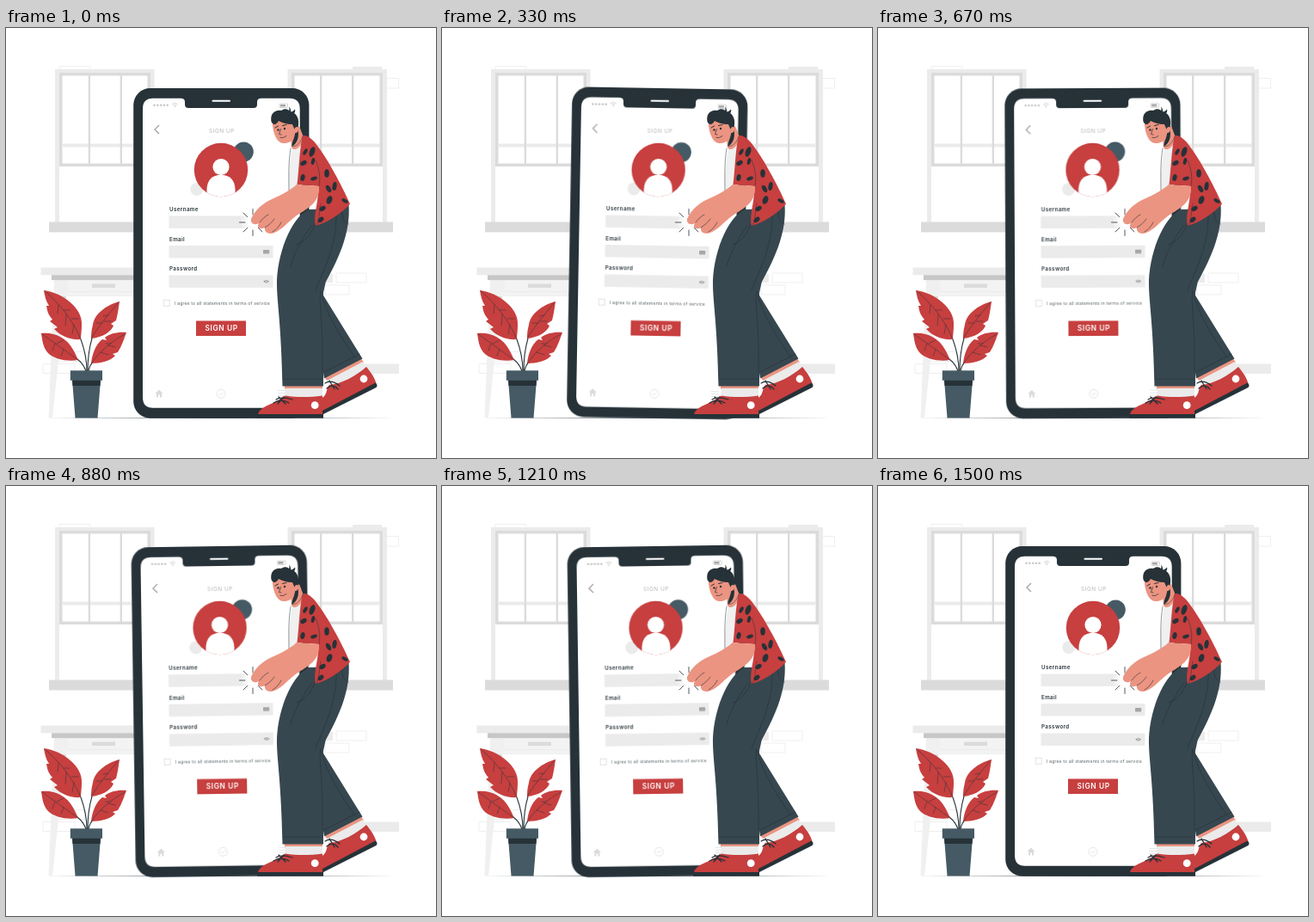
Animation, 500 px wide and 500 px high, one loop 1540 ms. Source, as an HTML page:

```html
<!DOCTYPE html>
<html lang="en">
<head>
<meta charset="utf-8">
<title>Sign up</title>
<style>
  html, body { margin: 0; width: 100%; height: 100%; overflow: hidden; background: #fff; }
  svg { display: block; width: 100%; height: 100%; }
  #phone { transform-origin: 250px 262px; }
  text { font-family: Inter, Lato, sans-serif; }
  .label { font-weight: 600; font-size: 6.2px; letter-spacing: .4px; fill: #263238; }
  .red { fill: #c73f3f; }
  .dark { fill: #263238; }
  .slate { fill: #455a64; }
  .skin { fill: #eb9481; }
  .pants { fill: #37474f; }
  .pale { fill: #ebebeb; }
  .grey { fill: #dbdbdb; }
  .ink { fill: none; stroke: #263238; stroke-linecap: round; stroke-linejoin: round; }
  .thin { fill: none; stroke: #ebebeb; }
</style>
</head>
<body>
<svg viewBox="0 0 500 500" stroke-width=".8">
  <defs>
    <clipPath id="face"><circle cx="250" cy="165" r="31.200"/></clipPath>
    <radialGradient id="glow">
      <stop offset=".35" stop-color="#fff"/>
      <stop offset="1" stop-color="#fff" stop-opacity="0"/>
    </radialGradient>
    <g id="window">
      <path class="pale" fill-rule="evenodd" d="M57 48H172.500V226H57ZM62 53V226H167.500V53Z"/>
      <path class="grey" fill-rule="evenodd" d="M62 52H168V161H62ZM65.500 55.500V157.500H164.500V55.500Z"/>
      <path class="pale" d="M65.500 134.500H164.500V138.500H65.500Z"/>
      <path class="grey" d="M95.700 55H98V158H95.700ZM132.700 55H135V158H132.700Z"/>
      <rect class="grey" x="50" y="225.500" width="118" height="12"/>
    </g>
  </defs>

  <g id="room">
    <path class="thin" d="M62 48V44.500H98V48M442 58.500H456.500V70H442M43 390.500H80V401.500H43ZM60 376.500H92V387.500H60ZM384 285H419V296H384ZM371 299H399V310H371Z"/>
    <rect class="pale" x="403" y="45" width="34" height="4"/>
    <use href="#window"/>
    <use href="#window" transform="matrix(-1 0 0 1 500 0)"/>
    <path fill="#f0f0f0" d="M56 293H71L54 453H49.500Z"/>
    <rect fill="#f3f3f3" x="70" y="293" width="90" height="18"/>
    <path class="thin" d="M72 293V306.500H150M70 293V311.500H150"/>
    <rect class="grey" x="100" y="297.500" width="27" height="4.500"/>
    <rect class="pale" x="40.500" y="278.500" width="115" height="8.800"/>
    <rect fill="#c7c7c7" x="53" y="287.300" width="100" height="5.800"/>
    <path class="grey" d="M64 312H70L69.500 317H63.500Z"/>
    <rect class="pale" x="368" y="286" width="12" height="10"/>
    <rect class="pale" x="396" y="390.500" width="61" height="11.500"/>
    <path class="dark" d="M44 453.600L250 453.200L453 453.600L250 454Z"/>
  </g>

  <g id="phone">
    <rect class="dark" x="148.200" y="70.100" width="204.200" height="383.600" rx="19.500"/>
    <path fill="#fff" d="M171 81.800H203Q208 81.800 208 86V89Q208 93 212 93H288Q292 93 292 89V86Q292 81.800 297 81.800H329.500Q341.700 81.800 341.700 94V429.500Q341.700 441.800 329.500 441.800H171Q159 441.800 159 429.500V94Q159 81.800 171 81.800Z"/>
    <path stroke="#fff" stroke-width="2" stroke-linecap="round" d="M240.500 84.700H260"/>
    <g id="status" fill="#c7c7c7"></g>
    <path fill="none" stroke="#c7c7c7" d="M193 88.700Q196.300 85.900 199.600 88.700M194.500 90.200Q196.300 88.700 198.100 90.200"/>
    <circle cx="196.300" cy="91.500" r=".7" fill="#c7c7c7"/>
    <rect x="318" y="88" width="9.500" height="4.500" rx="1" fill="none" stroke="#c7c7c7"/>
    <rect x="319" y="89" width="6" height="2.500" fill="#a6a6a6"/>
    <path fill="none" stroke="#a6a6a6" stroke-width="1.400" d="M178 113L173 118L178 123"/>
    <text x="251" y="122.300" text-anchor="middle" font-size="6.500" letter-spacing=".5" fill="#b8b8b8">SIGN UP</text>

    <circle class="slate" cx="276.300" cy="144" r="11.500"/>
    <circle class="pale" cx="221.800" cy="187.500" r="7.500"/>
    <circle class="red" cx="250" cy="165" r="31.200"/>
    <g fill="#fff" clip-path="url(#face)">
      <circle cx="250" cy="161.500" r="9.600"/>
      <path d="M233.500 198V188C233.500 177 240 170.700 250 170.700S266.500 177 266.500 188V198Z"/>
    </g>

    <g id="fields"></g>
    <rect fill="#a6a6a6" x="299" y="258" width="7.200" height="4.400" rx=".7"/>
    <path fill="#a6a6a6" d="M299 294.700Q302.600 291.200 306.200 294.700Q302.600 298.200 299 294.700Z"/>
    <circle cx="302.600" cy="294.700" r=".8" fill="#ebebeb"/>
    <rect x="183.200" y="316.200" width="7" height="7" fill="none" stroke="#dbdbdb"/>
    <text x="196" y="322" font-size="5.200" letter-spacing=".12" fill="#5c666b">I agree to all statements in terms of service</text>
    <rect class="red" x="221" y="340.500" width="58" height="17.500"/>
    <text x="250.600" y="352.300" text-anchor="middle" font-size="8.300" font-weight="600" letter-spacing=".65" fill="#fff">SIGN UP</text>

    <path class="grey" d="M173.500 425L178 420.500L182.500 425H181V429.500H179V426.500H177V429.500H175V425Z"/>
    <g fill="none" stroke="#e0e0e0">
      <circle cx="250" cy="425.300" r="5"/>
      <path d="M247.700 425L249.600 427L252.500 423.800M315.500 421.500H325M315.500 424.500H325M315.500 427.500H325"/>
    </g>
  </g>

  <g id="plant">
    <path class="ink" stroke-width="1.100" d="M94 399C94 385 91 373 87 362M95 399C95 382 97 371 100 361M93 399C91 393 88 389 83 385M96 399C97 393 99 390 102 388"/>
    <path class="red" d="M44 305C66 308 90 326 88 346C88 352 87 357 87 362C75 363 63 358 56 350L60 348L51 341L54 339C48 332 48 328 47 323L50 323C46 317 45 311 44 305Z"/>
    <path class="red" d="M132 318C117 322 103 332 101 345C99 352 99 357 99 361C111 360 122 354 125 346L122 344L128 340C130 332 131 325 132 318Z"/>
    <path class="red" d="M41 355C55 353 71 360 78 374C81 379 82 382 84 386C73 388 56 386 48 377C43 371 42 362 41 355Z"/>
    <path class="red" d="M140 354C131 353 121 355 115 360L117 363L112 362C104 368 100 380 99 390C110 390 122 387 127 381L124 379L130 377C135 369 137 362 140 354Z"/>
    <path class="ink" stroke-width=".5" d="M45 306C62 320 78 340 87 362M61 322L60 332M70 333L69 346M79 345L77 356M67 328L74 328M76 338L84 338M131 319C119 333 108 346 99 361M119 334L113 335M112 343L105 343M114 341L122 341M42 356C56 366 70 376 84 386M57 367L54 375M67 374L64 381M59 367L67 363M138 356C122 365 110 375 99 390M122 367L116 367M119 369L127 371M110 377L119 380"/>
    <path class="slate" d="M77 409H110L106.500 453.500H80.500Z"/>
    <path class="dark" d="M77 409H110L109.500 416H77.500Z"/>
    <rect class="slate" x="74.800" y="398.300" width="37.200" height="11.500"/>
  </g>

  <g id="spark">
    <circle cx="288" cy="225" r="16" fill="url(#glow)"/>
  </g>

  <g id="man">
    <path class="skin" d="M370 406L413 384L416 389L374 411Z"/>
    <path class="pale" d="M373 410L415 388L421 397L378 420Z"/>
    <path class="red" d="M368 446V430C374 426 372 419 376 415C390 414 408 404 419 394C424 400 429 407 430.500 413.500Z"/>
    <path class="dark" d="M368 445L429.500 412.500Q433 415 430.500 418L368 449.500Z"/>
    <path class="ink" stroke-width="1.300" d="M371 413C377 409 383 412 388 416M373 419C378 414 383 416 386 420M376 410L382 420"/>
    <circle cx="416" cy="408" r="4.400" fill="#fff"/>

    <rect class="skin" x="324" y="415" width="44" height="5"/>
    <rect class="pale" x="324.500" y="419" width="43.500" height="13"/>
    <path class="red" d="M293 450C294 440 312 437 320 430.500Q323 428 325 427.500C338 429.500 353 429.500 368 427.500V450Z"/>
    <path class="dark" d="M292.500 449H369V453.800H292Z"/>
    <path class="ink" stroke-width="1.300" d="M314 432C320 428 327 430 333 432M311 436C317 432 324 433 329 436M317 429L325 437M323 429L316 437"/>
    <circle cx="359.200" cy="438.700" r="4.400" fill="#fff"/>

    <path class="pants" d="M398.500 205C401 240 386 270 366 306L414.500 384.500L370 407.500L358 330L370 215Z"/>
    <path class="pants" d="M352 211C331 221 314.500 264 315 300C315.500 322 320 345 321.500 416.500H369V308L390 210Z"/>
    <path class="ink" stroke-width=".6" d="M366 306C363 316 369 340 368 400M355 230C342 248 334 265 331 277M359 228C354 243 346 249 338 252M391 211C390 221 393 226 398 228M384 216C385 253 368 284 360 305M322 408H368M370 400L411 379M366 306C372 333 389 359 405 382"/>

    <path fill="#f0f0f0" d="M334 134C330 154 328 174 329 192L344 190L348 134Z"/>
    <path class="skin" d="M331 129L332 139C336 145 345 137 346 127L341 114Z"/>
    <path class="red" d="M345 125C352 124 359 132 364 139.500C374 153 389 180 400 204.500C390 216 374 226 360 230C358 222 360 213 362 201L364 184L338.500 182C341 162 341 142 345 125Z"/>
    <g id="spots" class="dark"></g>
    <path class="ink" stroke-width=".5" d="M345 126C342 136 335 139 332 137M331 140C328 158 329 174 329 190M364 184C366 173 364 163 360 154M361 230C365 222 364 212 366 204"/>

    <path class="skin" d="M338 182C329 190 316 196 305 201C296 206 289 213 285 222C284 227 289 230 294 227C291 232 295 235 301 232C300 239 307 240 312 238C321 235 328 225 338 218C352 209 365 203 364 184Z"/>
    <path class="ink" stroke-width=".6" d="M295 226C298 222 301 219 305 217M301 232C306 229 309 226 312 222M310 237C315 234 318 230 320 226"/>

    <path class="skin" d="M310 106C309 117 313 131 320 133.500C329 136 338 129 340 116L334 102H313Z"/>
    <path class="dark" d="M308.500 109C307 100 312 95 320 96C324 93 328 94 330 97C338 98 342 106 339.500 116L336 119L333 112C326 112 321 110 317 108C315 112 311 114 308.500 109Z"/>
    <path class="dark" d="M328.500 97C330 95 329.500 93 329 91.500C331 93 331.500 96 331 99ZM331 98C333 97 335 96 336 94.500C337 97 335 100 333 101Z"/>
    <path class="dark" d="M339.500 119C341 127 338.500 134 333 137.500C331 135 336 128 336.500 120Z"/>
    <ellipse class="skin" cx="337.500" cy="118.500" rx="2.400" ry="3.600" transform="rotate(18 337.500 118.500)"/>
    <circle class="dark" cx="316.500" cy="118.500" r="1.200"/>
    <circle class="dark" cx="324" cy="117" r="1.200"/>
    <path class="ink" stroke-width="1" d="M313 116L316.500 114M321.500 113.500L326 112.500"/>
    <path class="ink" stroke-width=".7" d="M319.500 117.500L317.500 123.500L320 124M319 127.500Q323 128.500 326 125.500"/>
  </g>
</svg>
<script>
  const $ = id => document.getElementById(id);
  const add = (parent, tag, attrs, text = "") => {
    const el = document.createElementNS("http://www.w3.org/2000/svg", tag);
    for (const key in attrs) el.setAttribute(key, attrs[key]);
    el.textContent = text;
    parent.append(el);
  };

  for (let i = 0; i < 5; i++) add($("status"), "circle", { cx: 172.5 + i * 3.8, cy: 89.8, r: 1.3 });

  ["Username", "Email", "Password"].forEach((name, i) => {
    const y = 213.3 + i * 34.5;
    add($("fields"), "text", { x: 190, y, class: "label" }, name);
    add($("fields"), "rect", { x: 189.5, y: y + 5.2, width: 121, height: 14.4, class: "pale" });
  });

  // Rays around the fingertip; the hand hides the right side.
  for (let i = 0; i < 8; i++) {
    const a = i * Math.PI / 4, c = Math.cos(a), s = Math.sin(a);
    add($("spark"), "path", { class: "ink", d: `M${287 + 9 * c} ${226 + 9 * s}L${287 + 15.5 * c} ${226 + 15.5 * s}` });
  }

  // x, y, rx, ry, tilt
  [
    [356, 144, 3, 6, 20], [348, 144, 2, 4, 30], [346, 157, 2.5, 4, 60], [357, 155, 2, 4, 15],
    [345, 174, 2.5, 4, 15], [358, 175, 2, 4, 70], [373, 169, 2.8, 4.8, 0], [382, 184, 2.5, 5, 10],
    [375, 187, 2.5, 4.5, -30], [376, 200, 3.2, 5, 20], [368, 210, 2.5, 4, 60], [394, 201, 2, 4, -60],
    [366, 223, 2.5, 4, 50]
  ].forEach(([cx, cy, rx, ry, tilt]) =>
    add($("spots"), "ellipse", { cx, cy, rx, ry, transform: `rotate(${tilt} ${cx} ${cy})` }));

  const sway = [[0, 0], [.25, 1], [.75, -1], [1, 0]];
  $("phone").animate(
    sway.map(([offset, deg]) => ({ offset, transform: `rotate(${deg}deg)`, easing: "ease" })),
    { duration: 1540, iterations: Infinity }
  );
</script>
</body>
</html>
```
